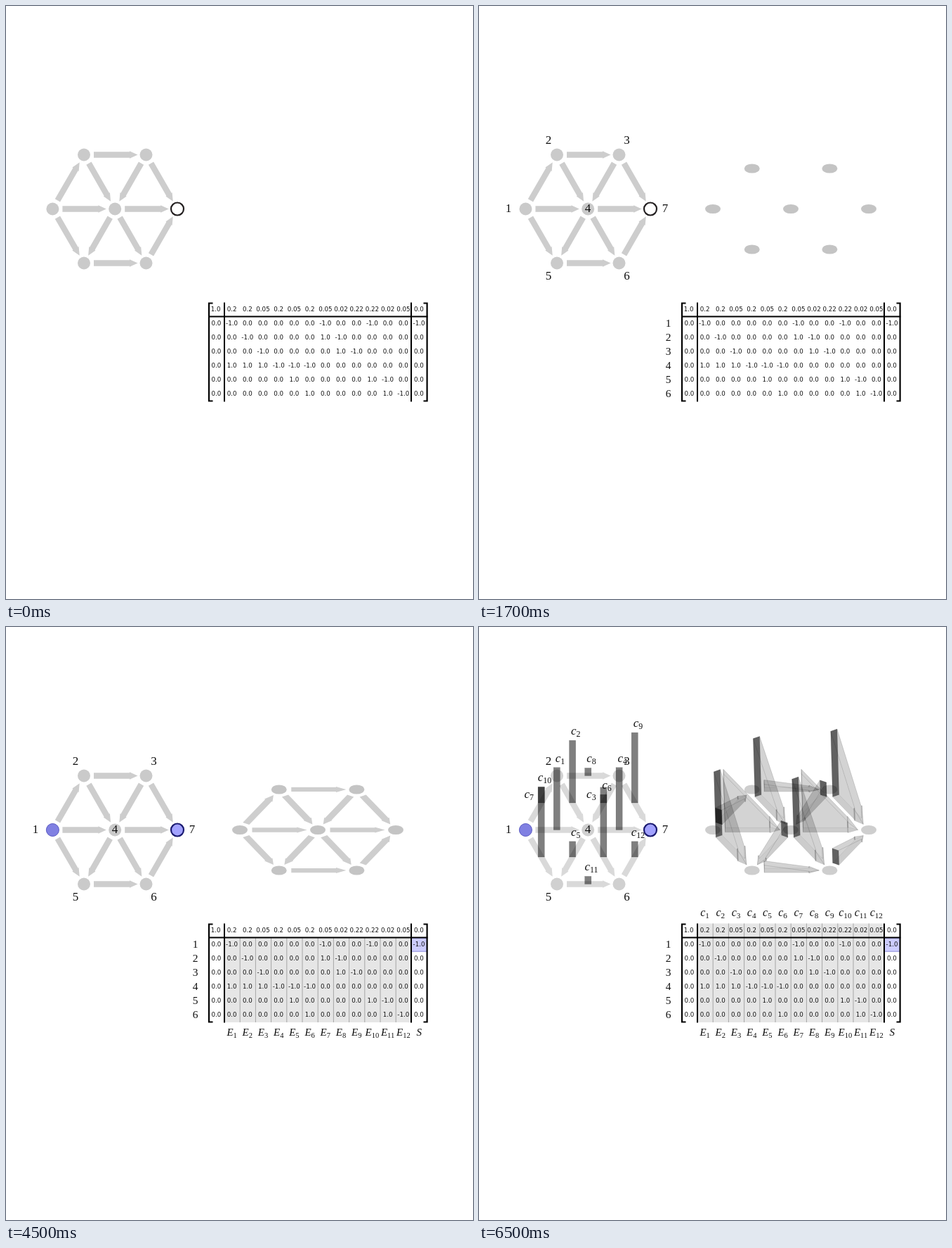
Write an HTML page that moves like this. It is 665 px wide and 843 px high and loops after 8 s.

```html
<!DOCTYPE html>
<html lang="en">
<head>
<meta charset="utf-8">
<style>
html, body { margin: 0; width: 100%; height: 100%; overflow: hidden; background: #fff; }
svg { display: block; }
text { text-anchor: middle; font-family: "Liberation Serif", serif; fill: #111; }
.cell { font: 8.7px "DejaVu Sans", sans-serif; }
.var { font-style: italic; }
.var tspan { font-style: normal; font-size: 70%; }
</style>
</head>
<body>
<svg id="stage" width="665" height="843" viewBox="0 0 665 843"></svg>
<script>
const LOOP = 8000, NODES = 500, EDGES = 2500, SUPPLY = 4500, COSTS = 6500;
const stage = document.getElementById('stage');
const layers = [];
let target;

// Everything added after this call is visible between from and to.
function layer(from, to = LOOP) {
  target = add('g', {}, stage);
  layers.push({ el: target, from, to });
}
function add(tag, attrs, parent = target) {
  const el = document.createElementNS('http://www.w3.org/2000/svg', tag);
  for (const k in attrs) el.setAttribute(k, attrs[k]);
  parent.appendChild(el);
  return el;
}
function text(str, x, y, size, cls = '') {
  const attrs = { x, y, class: cls };
  if (size) attrs['font-size'] = size;
  const el = add('text', attrs);
  el.textContent = str;
  return el;
}
function variable(name, sub, x, y, size) {
  const el = text(name, x, y, size, 'var');
  add('tspan', { dy: 2.8 }, el).textContent = sub;
}
const rect = (x, y, width, height, fill, more = {}) => add('rect', { x, y, width, height, fill, ...more });
const line = (d, width = 2.2, stroke = '#000') => add('path', { d, fill: 'none', stroke, 'stroke-width': width });
const poly = (pts, fill, more = {}) => add('polygon', { points: pts.map(p => p.map(v => v.toFixed(2))).join(' '), fill, ...more });

// Graph
const nodes = [[66.4, 288.5], [111, 211.5], [199.5, 211.5], [155.2, 288.5], [111, 365.5], [199.5, 365.5], [244, 288.5]];
const labels = [[42, 288], [99, 191], [210.5, 191], [155, 288], [99, 383.5], [210.5, 383.5], [265, 288]];
const edges = [[1, 4], [2, 4], [3, 4], [4, 7], [4, 5], [4, 6], [1, 2], [2, 3], [3, 7], [1, 5], [5, 6], [6, 7]]
  .map(e => e.map(n => nodes[n - 1]));
const costs = [.2, .2, .05, .2, .05, .2, .05, .025, .225, .225, .025, .05];
const shown = [.2, .2, .05, .2, .05, .2, .05, .02, .22, .22, .02, .05];
const outline = [[14, -4.2], [65, -4.2], [65, -5.3], [76.5, 0], [65, 5.3], [65, 4.2], [14, 4.2]];

const flat = p => p;
const tilt = ([x, y]) => [333 + (x - 66.4) * 1.25, 288.5 + (y - 288.5) * .747];
const mid = ([a, b]) => [(a[0] + b[0]) / 2, (a[1] + b[1]) / 2];

function arrow([a, b], view) {
  const len = Math.hypot(b[0] - a[0], b[1] - a[1]);
  const ux = (b[0] - a[0]) / len, uy = (b[1] - a[1]) / len;
  return outline.map(([s, w]) => view([a[0] + s * ux - w * uy, a[1] + s * uy + w * ux]));
}
function discs(fill) {
  nodes.slice(0, 6).forEach(([cx, cy]) => add('circle', { cx, cy, r: 9, fill }));
}
function ellipses(fill) {
  nodes.map(tilt).forEach(([cx, cy]) => add('ellipse', { cx, cy, rx: 11, ry: 6.6, fill }));
}
function ring(i, fill, stroke, width) {
  add('circle', { cx: nodes[i][0], cy: nodes[i][1], r: 9, fill, stroke, 'stroke-width': width });
}
// Arrow-shaped block, high at its tail and falling to nothing at its tip.
function wedge(edge, cost) {
  const base = arrow(edge, tilt);
  const top = base.map(([x, y], i) => {
    const h = 415 * cost * (76.5 - outline[i][0]) / 62.5;
    return [x - h * .03, y - h];
  });
  const edgeLine = { stroke: '#000', 'stroke-opacity': .14, 'stroke-width': .5 };
  poly(base, 'rgba(0,0,0,.12)');
  base.forEach((p, i) => {
    const j = (i + 1) % base.length, tail = j === 0;
    poly([p, base[j], top[j], top[i]], tail ? 'rgba(0,0,0,.58)' : 'rgba(0,0,0,.09)', edgeLine);
  });
  poly(top, 'rgba(0,0,0,.09)', edgeLine);
}

layer(0, COSTS);
edges.forEach(e => poly(arrow(e, flat), '#cdcdcd'));
discs('#cacaca');

layer(NODES, COSTS);
ellipses('#c4c4c4');

layer(EDGES, COSTS);
edges.forEach(e => poly(arrow(e, tilt), '#cecece'));

layer(COSTS);
edges.forEach(e => poly(arrow(e, flat), '#d9d9d9'));
discs('#d0d0d0');
ellipses('#cecece');
edges.forEach((e, i) => wedge(e, costs[i]));

layer(0, SUPPLY);
ring(6, '#fff', '#231f20', 2.2);

layer(SUPPLY);
ring(0, '#8080e2', '#5a5ac4', 1);
ring(6, '#a2a2ff', '#1a1a70', 2.2);

layer(COSTS);
edges.forEach((e, i) => {
  const [x, y] = mid(e), h = 444 * costs[i];
  rect(x - 4.6, y - h, 9.2, h, 'rgba(0,0,0,.5)', { stroke: '#000', 'stroke-opacity': .25, 'stroke-width': .5 });
});
edges.forEach((e, i) => {
  const [x, y] = mid(e), aside = i === 2 || i === 6;
  if (aside) variable('c', i + 1, x - 17.5, y - 7, 17);
  else variable('c', i + 1, x + 4.7, y - 444 * costs[i] - 8, 17);
});

layer(NODES);
labels.forEach(([x, y], i) => text(i + 1, x, y + 5.3, 17));

layer(EDGES, SUPPLY);
edges.forEach((e, i) => variable('E', i + 1, mid(e)[0], mid(e)[1] + 5, 17));

// Matrix
const colX = k => 299.4 + 22.2 * k;
const rowY = k => 431.2 + 19.95 * k;
const top0 = 421.5, rule = 441.5, bottom = 562;

function shade(y) {
  rect(311, y, 266, bottom - y, '#e6e6e6');
  for (let k = 1; k < 12; k++) line(`M${colX(k) + 11.6} ${y}V${bottom}`, 1, '#a6a6a6');
}
layer(EDGES, COSTS);
shade(rule);
layer(COSTS);
shade(top0);
layer(SUPPLY);
rect(577.5, 442, 22, 19.2, '#ccccff', { stroke: '#8e8ed8', 'stroke-width': 1 });

layer(0);
line(`M294.5 ${top0 + 1}H289V${bottom - .5}H294.5M594.5 ${top0 + 1}H599.6V${bottom - .5}H594.5`);
line(`M288 ${rule}H600.5M311 ${top0}V${bottom + .5}M577 ${top0}V${bottom + .5}`, 2);
const fmt = v => Number.isInteger(v) ? v.toFixed(1) : String(v);
const head = [1, ...shown, 0];
for (let r = 0; r < 7; r++) {
  for (let c = 0; c < 14; c++) {
    let v = 0;
    if (r === 0) v = head[c];
    else if (c === 13) v = r === 1 ? -1 : 0;
    else if (c > 0) {
      const [from, to] = edges[c - 1], node = nodes[r - 1];
      v = node === from ? -1 : node === to ? 1 : 0;
    }
    text(fmt(v), colX(c) - (c === 0 && r === 0 ? .8 : 0), rowY(r) + 3.2, 0, 'cell');
  }
}

layer(NODES);
for (let r = 1; r < 7; r++) text(r, 269.5, rowY(r) + 4.8, 15.5);
layer(EDGES);
for (let c = 1; c < 13; c++) variable('E', c, colX(c), 581, 15);
layer(SUPPLY);
text('S', 588.3, 581, 15, 'var');
layer(COSTS);
for (let c = 1; c < 13; c++) variable('c', c, colX(c), 411, 16);

function draw(now) {
  const t = now % LOOP;
  for (const { el, from, to } of layers) el.style.display = t >= from && t < to ? '' : 'none';
  requestAnimationFrame(draw);
}
draw(0);
</script>
</body>
</html>
```
